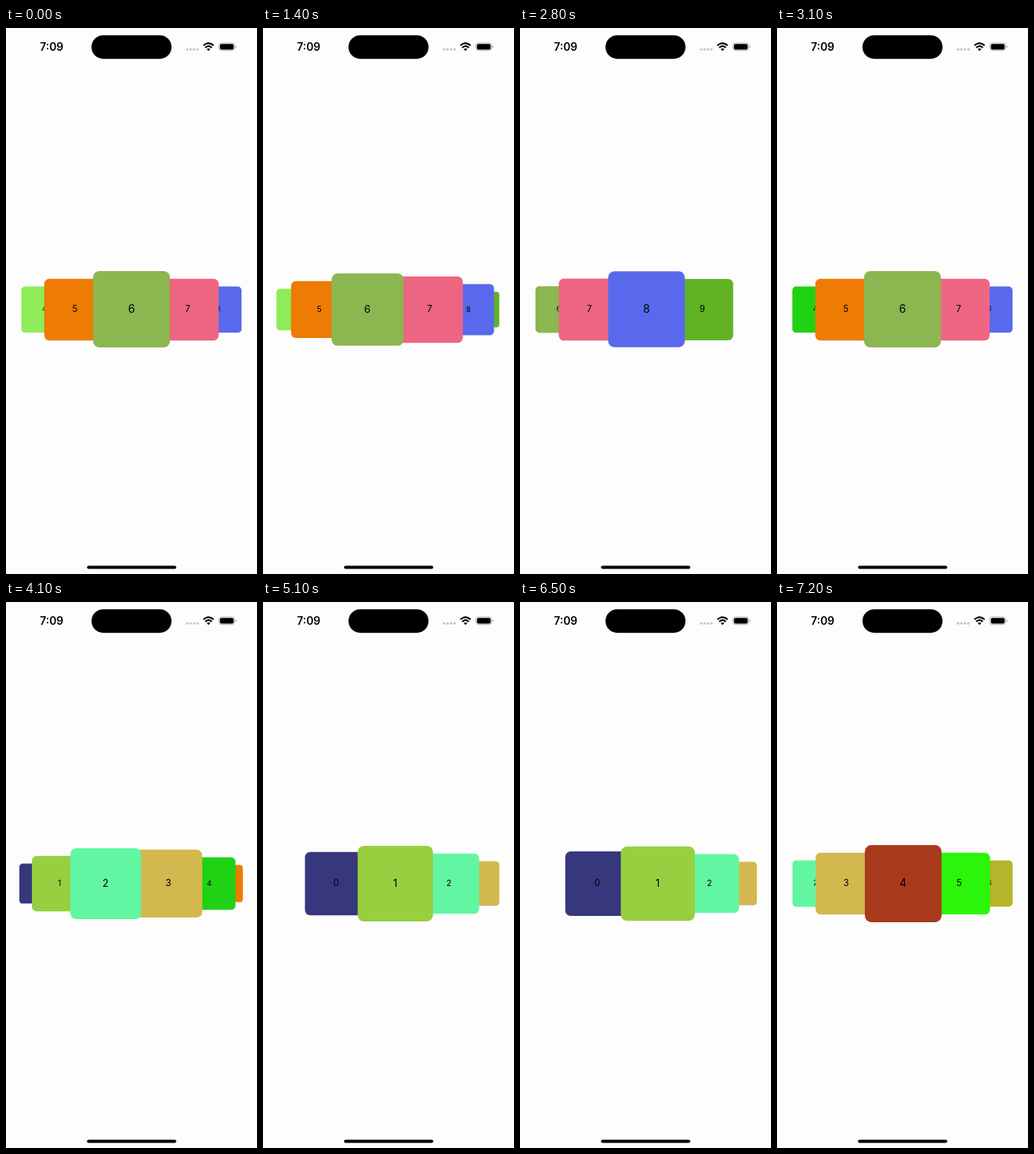
An HTML page that plays this animation: 320 by 694 pixels, repeating every 7300 ms.

```html
<!DOCTYPE html>
<html lang="en">
<head>
<meta charset="utf-8">
<title>Card carousel</title>
<style>
  html, body { margin: 0; width: 100%; height: 100%; overflow: hidden; background: #fdfdfd; }
  #stage { position: relative; width: 320px; height: 694px; overflow: hidden; background: #fdfdfd; }
  #chrome { position: absolute; left: 0; top: 0; z-index: 1; }
  #chrome text { font: 600 13.9px Inter, Roboto, sans-serif; }
  .card {
    position: absolute; left: 111.25px; top: 308.5px; width: 97.5px; height: 97.5px;
    border-radius: 8.1px; color: #000; text-align: center;
    font: 400 13.9px/97.5px Inter, Roboto, sans-serif;
  }
</style>
</head>
<body>
<div id="stage">
  <svg id="chrome" width="320" height="694" viewBox="0 0 320 694">
    <text x="58.2" y="28.8" text-anchor="middle">7:09</text>
    <rect x="109" y="9.2" width="102" height="30" rx="15"/>
    <g fill="#c6c6c6">
      <circle cx="230.9" cy="27.2" r="1.6"/><circle cx="235.3" cy="27.2" r="1.6"/>
      <circle cx="239.7" cy="27.2" r="1.6"/><circle cx="244.1" cy="27.2" r="1.6"/>
    </g>
    <g fill="none" stroke="#000" stroke-width="2">
      <path d="M251.7 22.3Q258.2 16.5 264.7 22.3"/>
      <path d="M254 24.9Q258.2 21.1 262.4 24.9"/>
    </g>
    <path d="M255.9 26.8Q258.2 25 260.5 26.8L258.2 29.2Z"/>
    <rect x="271.4" y="18.9" width="20.2" height="9.8" rx="3.1" fill="none" stroke="#a6a6a6" stroke-width=".8"/>
    <rect x="272.7" y="20.2" width="17.6" height="7.2" rx="2"/>
    <path d="M292.6 22.2q1.3 .5 1.3 1.6t-1.3 1.6z" fill="#a6a6a6"/>
    <rect x="103.3" y="683.4" width="113.8" height="4.1" rx="2.05"/>
  </svg>
</div>
<script>
const LOOP = 7300, STEP = 100;

// Each swipe: start time and the carousel position at every step
const glide = (end, gap, ratio) =>
  Array.from({ length: 8 }, (_, k) => end + gap * ratio ** k);
const swipes = [
  [0, [6]],
  [1400, [6.32, 7.45, 7.88, 8]],
  [2800, [7.986, 6.85, 6.2, 6]],
  [3900, [5.4, 3.4, 2.4, 2]],
  [5100, glide(0, 0.9, 0.45)],
  [6500, glide(4, -3.184, 0.44)]
];

// Cells get a fresh colour when they are recycled: colour, then [time, colour]
const cells = [
  ['#37377d'],
  ['#98cf41'],
  ['#62f6a3'],
  ['#d3b850'],
  ['#8eed58', [2800, '#20d214'], [6500, '#a9391b']],
  ['#ee7b04', [6500, '#2bf50a']],
  ['#8bb650', [6500, '#b4b52b']],
  ['#ee6582'],
  ['#5869ed'],
  ['#62b324']
];

const stage = document.getElementById('stage');
const cards = cells.map((_, i) => {
  const el = document.createElement('div');
  el.className = 'card';
  el.textContent = i;
  return stage.appendChild(el);
});

function positionAt(t) {
  const [start, path] = swipes.findLast(([at]) => at <= t);
  return path[Math.min(Math.floor((t - start) / STEP), path.length - 1)];
}

function colourAt([first, ...changes], t) {
  const change = changes.findLast(([at]) => at <= t);
  return change ? change[1] : first;
}

function draw(t) {
  const pos = positionAt(t);
  cards.forEach((el, i) => {
    const d = i - pos, far = Math.abs(d);
    const x = d * (88.5 - 16.5 * far);
    el.style.display = far < 3.95 ? 'block' : 'none';
    el.style.transform = `translateX(${x.toFixed(3)}px) scale(${(1 - 0.2 * far).toFixed(4)})`;
    el.style.zIndex = 100 - Math.round(far * 10);
    el.style.background = colourAt(cells[i], t);
  });
}

const begin = performance.now();
function tick() {
  draw((performance.now() - begin) % LOOP);
  requestAnimationFrame(tick);
}
tick();
</script>
</body>
</html>
```
